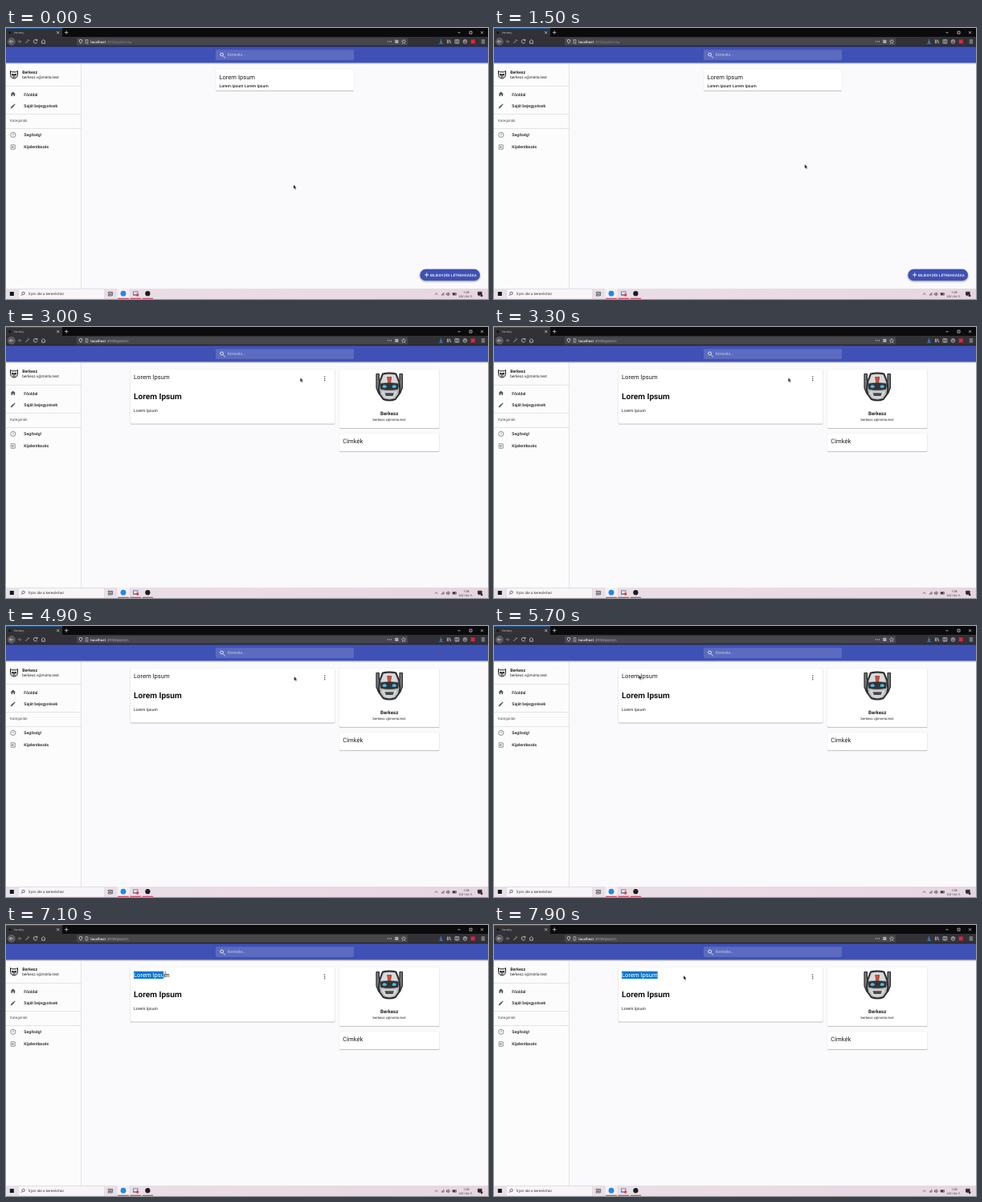
These frames come from a looping animation (600x338 px, 8000 ms). An HTML page:

```html
<!DOCTYPE html>
<html lang="hu">
<head>
<meta charset="utf-8">
<title>Bejegyzések</title>
<style>
html, body { margin: 0; width: 100%; height: 100%; overflow: hidden; background: #faf9fb; }
svg { display: block; }
text { font-family: Roboto, sans-serif; font-size: 5.2px; fill: #222; white-space: pre; text-rendering: geometricPrecision; }
.os { font-family: "Open Sans", sans-serif; }
.b { font-weight: 700; }
.m { font-weight: 500; }
.mid { text-anchor: middle; }
.title { font-size: 7.6px; }
.line { fill: none; stroke: currentColor; stroke-width: .8; }
.card { fill: #fff; stroke: #e9e8eb; stroke-width: .5; }
.shade { fill: #b9b8bc; transform: translateY(.9px); }

.list, .post, .arrow, .hand, .beam, .hover { animation: 8s step-end infinite; }
.list { animation-name: list; }
.post { animation-name: post; }
.arrow { animation-name: arrow; }
.hand { animation-name: hand; }
.beam { animation-name: beam; }
.hover { animation-name: hover; }
.ripple { animation: ripple 8s step-end infinite; }
.pointer { animation: move 8s linear infinite; }
.pick { animation: pick 8s linear infinite; }

@keyframes list { 0% { visibility: visible } 37.5%, 100% { visibility: hidden } }
@keyframes post { 0% { visibility: hidden } 37.5%, 100% { visibility: visible } }
@keyframes hover { 0% { opacity: 0 } 33.75% { opacity: 1 } 37.5%, 100% { opacity: 0 } }
@keyframes hand { 0% { opacity: 0 } 28.75% { opacity: 1 } 37.5%, 100% { opacity: 0 } }
@keyframes beam { 0% { opacity: 0 } 76.25% { opacity: 1 } 91.25%, 100% { opacity: 0 } }
@keyframes arrow {
  0% { opacity: 1 } 28.75% { opacity: 0 } 37.5% { opacity: 1 }
  76.25% { opacity: 0 } 91.25%, 100% { opacity: 1 }
}
@keyframes ripple {
  0% { r: 0 } 33.75% { r: 10px } 35% { r: 22.5px } 36.25% { r: 42px } 37.5%, 100% { r: 0 }
}
@keyframes move {
  0% { transform: translate(358px, 195.5px); animation-timing-function: step-end }
  11.25% { transform: translate(358px, 195.5px); animation-timing-function: steps(6) }
  18.75% { transform: translate(386.7px, 170px); animation-timing-function: steps(3) }
  22.5% { transform: translate(394px, 115.5px); animation-timing-function: steps(6) }
  30% { transform: translate(366.3px, 63.3px); animation-timing-function: step-end }
  61.25% { transform: translate(358.6px, 63px); animation-timing-function: step-end }
  62.5% { transform: translate(357.5px, 63px); animation-timing-function: step-end }
  63.75% { transform: translate(357.5px, 63px); animation-timing-function: steps(7) }
  72.5% { transform: translate(151px, 61px); animation-timing-function: steps(2) }
  75% { transform: translate(157.5px, 60px); animation-timing-function: step-end }
  76.25% { transform: translate(159.5px, 61px); animation-timing-function: step-end }
  80% { transform: translate(160px, 60.5px); animation-timing-function: step-end }
  82.5% { transform: translate(160px, 60.5px); animation-timing-function: steps(6) }
  90% { transform: translate(206px, 62px); animation-timing-function: step-end }
  91.25% { transform: translate(208.5px, 61.5px); animation-timing-function: step-end }
  93.75% { transform: translate(208.5px, 61.5px); animation-timing-function: steps(4) }
  98.75%, 100% { transform: translate(236px, 63px); animation-timing-function: step-end }
}
@keyframes pick {
  0%, 82.5% { width: 0; animation-timing-function: steps(6) }
  90%, 100% { width: 44.6px }
}
</style>
</head>
<body>
<svg width="600" height="338" viewBox="0 0 600 338">
  <defs>
    <linearGradient id="bar">
      <stop stop-color="#e6e1ea"/><stop offset=".5" stop-color="#ebdbe4"/><stop offset="1" stop-color="#e6d6e2"/>
    </linearGradient>
    <clipPath id="cardClip"><rect x="261" y="51" width="172" height="27" rx="1.5"/></clipPath>
    <clipPath id="pickClip"><rect class="pick" x="159" y="57" width="0" height="11"/></clipPath>
  </defs>
  <rect width="600" height="338" fill="#faf9fb"/>

  <!-- sidebar -->
  <g color="#555">
    <path d="M0 43h93v282H0z" fill="#fdfcfd"/>
    <path d="M93.5 43v282M0 72.5h93M0 107.5h93M0 125.5h93" stroke="#dedde0" stroke-width=".8"/>
    <path d="M5.5 53.6l2 1.2h5l2-1.2v5l-.8 2.4-1.8 1.8H8.1l-1.8-1.8-.8-2.4z" fill="#eee" stroke="#1c1c1e" stroke-width="1"/>
    <path d="M6.8 57l2.4.6h1.6l2.4-.6-.3 2-2 .4H9.1l-2-.4zM8.2 60.6h3.6v.8H8.2z" fill="#1c1c1e"/>
    <text x="20.2" y="56.9" class="b" fill="#111">Berkesz</text>
    <text x="20.2" y="63.1" style="font-size:4.75px">berkesz.v@minta.test</text>
    <g fill="#555">
      <path transform="translate(4.9 78.6) scale(.32)" d="M10 20v-6h4v6h5v-8h3L12 3 2 12h3v8z"/>
      <path transform="translate(4.9 93.6) scale(.32)" d="M3 17.25V21h3.75L17.81 9.94l-3.75-3.75zM20.71 7.04a1 1 0 0 0 0-1.41l-2.34-2.34a1 1 0 0 0-1.41 0l-1.83 1.83 3.75 3.75z"/>
    </g>
    <circle cx="8.8" cy="133.3" r="3.1" class="line" style="stroke-width:.65"/>
    <text x="8.8" y="135" class="mid" style="font-size:4.6px;fill:#555">?</text>
    <path class="line" style="stroke-width:.65" d="M6.2 147.4v-1.6h5v5.4h-5v-1.6M5.4 148.5h3.8M7.9 147.1l1.4 1.4-1.4 1.4"/>
    <g class="m">
      <text x="22.3" y="84.5">Főoldal</text>
      <text x="22.3" y="99.4">Saját bejegyzések</text>
      <text x="22.3" y="135.2">Segítség!</text>
      <text x="22.3" y="150.2">Kijelentkezés</text>
    </g>
    <text x="5" y="117.1" style="font-size:4.5px;fill:#555">Kategóriák</text>
  </g>

  <!-- post list -->
  <g class="list">
    <rect class="shade" x="261" y="51" width="172" height="27" rx="1.5"/>
    <rect class="card" x="261" y="51" width="172" height="27" rx="1.5"/>
    <g clip-path="url(#cardClip)">
      <rect class="hover" x="261" y="51" width="172" height="27" fill="#f3f3f3"/>
      <circle class="ripple" cx="366.5" cy="63.5" r="0" fill="#cfcfcf"/>
    </g>
    <text x="265.4" y="64.2" class="title">Lorem Ipsum</text>
    <text x="265.4" y="74" class="m" style="font-size:5.1px">Lorem Ipsum Lorem Ipsum</text>

    <rect x="515.3" y="300.8" width="74.7" height="14.2" rx="7.1" fill="#3f51b5" style="filter:drop-shadow(0 1px 1.2px #0007)"/>
    <path d="M521.2 307.9h5M523.7 305.4v5" stroke="#fff" stroke-width=".9"/>
    <text x="528" y="309.5" class="m" style="font-size:4.4px;letter-spacing:.14px;fill:#fff">BEJEGYZÉS LÉTREHOZÁSA</text>
  </g>

  <!-- single post -->
  <g class="post">
    <g id="cards">
      <rect class="shade" x="154.5" y="52.5" width="255" height="68" rx="1.5"/>
      <rect class="shade" x="415" y="52.5" width="124.5" height="73.5" rx="1.5"/>
      <rect class="shade" x="415" y="132.5" width="124.5" height="22.5" rx="1.5"/>
      <rect class="card" x="154.5" y="52.5" width="255" height="68" rx="1.5"/>
      <rect class="card" x="415" y="52.5" width="124.5" height="73.5" rx="1.5"/>
      <rect class="card" x="415" y="132.5" width="124.5" height="22.5" rx="1.5"/>
    </g>
    <text x="159" y="65" class="title">Lorem Ipsum</text>
    <g clip-path="url(#pickClip)">
      <path d="M159 57.8h45v9.2h-45z" fill="#0078d7"/>
      <text x="159" y="65" class="title" style="fill:#fff">Lorem Ipsum</text>
    </g>
    <text x="159" y="89.7" class="b" style="font-size:10.1px;fill:#111">Lorem Ipsum</text>
    <text x="159" y="105.8" style="font-size:5.1px">Lorem Ipsum</text>
    <g fill="#444"><circle cx="396.7" cy="62.1" r=".75"/><circle cx="396.7" cy="64.4" r=".75"/><circle cx="396.7" cy="66.7" r=".75"/></g>

    <!-- robot -->
    <g stroke="#2b2b2d" stroke-linejoin="round">
      <path d="M461 58.5h3.4v8l3 2v13l-3.6 1.5-2.8-7zM493.4 58.5H490v8l-3 2v13l3.6 1.5 2.8-7z" fill="#77797c" stroke-width="1.2"/>
      <path d="M469 58.4q8.2-1.6 16.4 0l3.8 9.6 1.2 10-1.2 6-4.4 6q-7.6 3-15.2 0l-4.4-6-1.2-6 1.2-10z" fill="#b4b6b8" stroke-width="2"/>
      <path d="M470 60q7.2-1.3 14.4 0l3 9h-20.4z" fill="#d9dadb" stroke="none"/>
      <path d="M466 71q11.2-2.4 22.4 0l-.4 6.4q-10.8 2.4-21.6 0z" fill="#333437" stroke-width=".6"/>
      <path d="M474.6 62.5h5.2l-1.2 7h-2.8z" fill="#e3492f" stroke-width=".5"/>
      <path d="M467.5 79.8q9.7 2 19.4 0l-.8 3.6-3.4 5.2q-5.5 1.6-11 0l-3.4-5.2z" fill="#d4d5d7" stroke="none"/>
      <path d="M471.5 82.3h11.4l-1.3 3.6h-8.8z" fill="#47484b" stroke="none"/>
    </g>
    <g fill="#42bce9"><ellipse cx="471.2" cy="74.2" rx="2.5" ry="1.9"/><ellipse cx="483.2" cy="74.2" rx="2.5" ry="1.9"/></g>

    <text x="477.2" y="109.5" class="b mid" style="font-size:6.2px">Berkesz</text>
    <text x="477" y="116.6" class="mid" style="font-size:4.25px">berkesz.v@minta.test</text>
    <text x="419.2" y="145.1" class="title">Címkék</text>
  </g>

  <!-- app bar -->
  <path d="M0 43h600v2H0z" fill="#d5d4dc"/>
  <path d="M0 23h600v20.6H0z" fill="#3f51b5"/>
  <rect x="261" y="27.3" width="172" height="12.6" rx="1.3" fill="#5c6bc0"/>
  <path d="M270.4 35l2.2 2.2" stroke="#fff" stroke-width=".9"/>
  <circle cx="268.6" cy="33" r="1.9" fill="none" stroke="#fff" stroke-width=".8"/>
  <text x="275.8" y="35.4" style="fill:#c2c8e8">Keresés...</text>

  <!-- browser -->
  <path d="M0 0h600v11.4H0z" fill="#0b0b0d"/>
  <path d="M0 11h600v12H0zM0 0h70v12H0z" fill="#323236"/>
  <path d="M0 22.8h600v.5H0z" fill="#0b0b0d"/>
  <path d="M0 0h70v.5H0z" fill="#0a84ff"/>
  <rect x="88" y="12.3" width="412" height="9.4" rx=".8" fill="#46464b"/>
  <circle cx="4.8" cy="5.8" r="1.5" fill="#111"/>
  <text x="9.8" y="7" class="os" style="font-size:3.3px;fill:#ddd">Verseny,</text>
  <g class="line" color="#d8d8dc" style="stroke-width:.75">
    <path d="M63.2 4.2l3 3m0-3l-3 3M75.2 3.4v4.4M73 5.6h4.4"/>
    <path d="M562.5 5.8h3M577 4.2h3v3h-3zM591 4.2l3 3m0-3l-3 3"/>
    <circle cx="6.8" cy="16.9" r="4.4" fill="#55555b" stroke="#85858b" stroke-width=".5"/>
    <path d="M9.2 16.9H4.6m1.9-2l-2 2 2 2"/>
    <path d="M14.2 16.9h4.4m-1.9-2l2 2-2 2" stroke="#8d8d92"/>
    <path d="M24.5 18.8l3.2-3.2m-.4-1.2l1.6 1.6"/>
    <path d="M38.6 15.4a2.3 2.3 0 1 0 .2 2.2M39 14v1.8h-1.8"/>
    <path d="M43.9 17l2.6-2.5 2.6 2.5M44.7 16.6v2.6h3.6v-2.6"/>
    <path d="M91.2 15l1.8-.6 1.8.6q0 3-1.8 4.2-1.8-1.2-1.8-4.2z"/>
    <path d="M99.2 14.7h2.6v4.4h-2.6z" stroke-width=".6"/>
    <path d="M475 16.9h5" stroke-dasharray="1 1" stroke-width="1"/>
    <path d="M495 14.4l.8 1.7 1.8.2-1.3 1.2.4 1.9-1.7-.9-1.7.9.4-1.9-1.3-1.2 1.8-.2z" stroke-width=".55"/>
    <path d="M541.5 14.2v4m-1.6-1.5l1.6 1.6 1.6-1.6M539.2 19.4h4.6" stroke="#45a1ff"/>
    <path d="M549.4 14.6v4.6M551 14.6v4.6M552.4 14.8l1.4 4.4"/>
    <path d="M559 14.8h4.8v4.2H559zM561.4 14.8V19"/>
    <circle cx="571.4" cy="16.9" r="2.3"/><circle cx="571.4" cy="16.4" r=".7"/>
    <path d="M591.7 15h4.4m-4.4 1.9h4.4m-4.4 1.9h4.4"/>
  </g>
  <rect x="484.2" y="14.8" width="4.2" height="4.2" fill="#aaaaae"/>
  <rect x="578.7" y="14.4" width="5" height="5" fill="#d7263d"/>
  <g class="os" style="font-size:4.4px">
    <text x="105.3" y="18.5" style="font:600 4.3px 'Open Sans',sans-serif;fill:#fff">localhost</text>
    <text x="125.4" y="18.5" style="font:4.3px 'Open Sans',sans-serif;fill:#8f8f95">:8100/posts/<tspan class="list">my</tspan></text>
    <text x="125.4" y="18.5" class="post" style="font:4.3px 'Open Sans',sans-serif;fill:#8f8f95">:8100/posts/6</text>
  </g>

  <!-- taskbar -->
  <path d="M0 325h600v13H0z" fill="url(#bar)"/>
  <path d="M15.5 325.4h107v12.6h-107z" fill="#f8f5f8" stroke="#cfc7d0" stroke-width=".4"/>
  <rect x="4.8" y="329" width="5" height="5" fill="#18181b"/>
  <g class="line" color="#29292c" style="stroke-width:.65">
    <circle cx="21.6" cy="330.9" r="1.7"/><path d="M20.4 332.2l-1.7 1.7"/>
    <path d="M127.3 329.4h4v1.6h-4zM127.3 332.4h4v1.6h-4zM132.6 329v5"/>
    <path d="M533.8 332.6l1.8-1.7 1.8 1.7"/>
    <path d="M542.3 333.5v-1.2m1.3 1.2v-2.3m1.3 2.3v-3.6"/>
    <path d="M548.4 331h1l1.2-1.1v4l-1.2-1.1h-1zM551.8 330.5q1 1.3 0 2.7"/>
    <path d="M556 330.6h4.4v2.5H556z"/>
    <path d="M587.4 329.2h4.8v3.8h-2.4l-1 1.2V333h-1.4z" fill="#29292c"/>
  </g>
  <path d="M556.3 331h3v1.8h-3z" fill="#29292c"/>
  <circle cx="592" cy="333.7" r="1.5" fill="#333"/>
  <text x="27.8" y="333.4" class="os" style="font-size:4.4px;fill:#1d1d1f">Írjon ide a kereséshez</text>
  <path d="M138.5 325h15v13h-15z" fill="#fff8"/>
  <circle cx="146" cy="331.2" r="3.4" fill="#2188e8"/>
  <path d="M158 328.4h6.4v5.4H158z" fill="#6b7f9c"/>
  <path d="M159 329.3h4.4v2.8H159z" fill="#dfe7ef"/>
  <circle cx="163.7" cy="333" r="1.7" fill="#e23b3f"/>
  <circle cx="176.4" cy="331.2" r="3.1" fill="#1c1c20"/>
  <path d="M139 337.3h14M154.5 337.3h13.5M169.8 337.3h13.2" stroke="#c22f4d" stroke-width="1"/>
  <text x="573" y="330.6" class="os mid" style="font-size:3.6px">1:08</text>
  <text x="572.6" y="335.8" class="os mid" style="font-size:3.4px">2021.04.11.</text>

  <!-- pointer -->
  <g class="pointer">
    <path class="arrow" d="M0 0v5l1.2-1 .9 2 .9-.4-.9-1.9h1.5z" fill="#111" stroke="#fff" stroke-width=".2"/>
    <path class="hand" d="M.1.2q.7-.4.8.5v1.5l1.8.4q.7.2.6 1l-.4 1.9H.4L-1 3.6q-.1-.8.6-.6l.5.4z" fill="#fff" stroke="#222" stroke-width=".5"/>
    <path class="beam" d="M-1-3h2M0-3v6M-1 3h2" fill="none" stroke="#222" stroke-width=".55"/>
  </g>
</svg>
</body>
</html>
```
